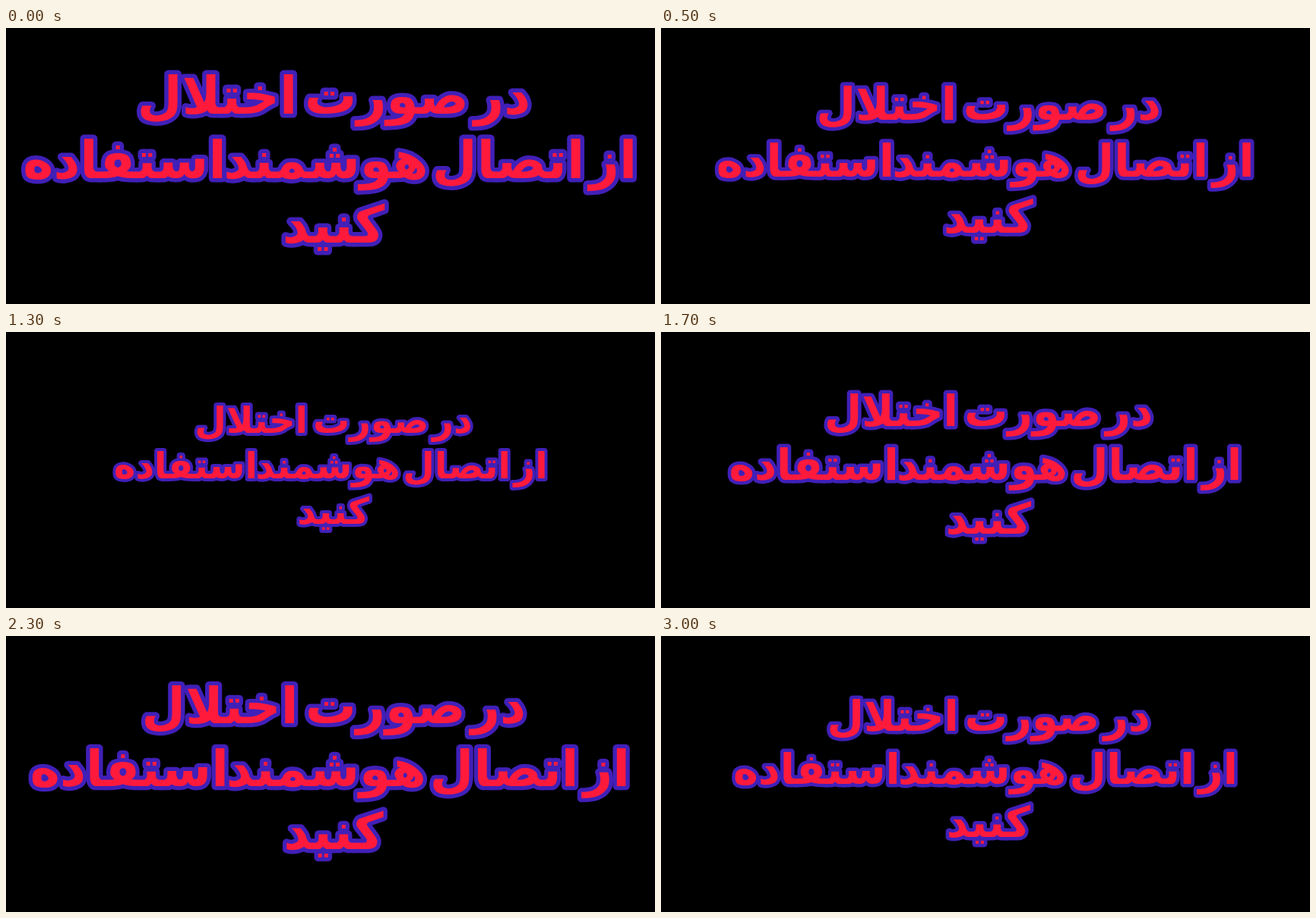
These frames come from a looping animation (854 px wide and 364 px high, 3100 ms). An HTML page with a canvas:

```html
<!DOCTYPE html>
<html lang="fa">
<head>
<meta charset="utf-8">
<style>
  html, body { margin: 0; width: 100%; height: 100%; overflow: hidden; background: #000; }
  canvas { display: block; }
</style>
</head>
<body>
<canvas id="stage" width="854" height="364"></canvas>
<script>
const ctx = document.getElementById('stage').getContext('2d');
const LOOP = 3100, STEP = 100;
const CENTER = { x: 430, y: 180.5 };
const LINE_HEIGHT = 85, BASELINE = 17.5;
// Words of each line with their middle, relative to the centre
const LINES = [
  [['در', 223], ['صورت', 71], ['اختلال', -152]],
  [['از', 369], ['اتصال', 231], ['هوشمند', -9], ['استفاده', -274]],
  [['کنید', 1]],
];
// [time in ms, scale], linear in between
const PULSE = [[0, 1], [1250, 0.69], [2210, 1], [2600, 0.9], [3100, 0.802]];

function scaleAt(t) {
  const i = PULSE.findIndex(([time]) => time > t);
  const [t0, s0] = PULSE[i - 1], [t1, s1] = PULSE[i];
  return s0 + (s1 - s0) * (t - t0) / (t1 - t0);
}

function eachWord(paint) {
  LINES.forEach((words, i) => {
    const y = BASELINE + (i - 1) * LINE_HEIGHT;
    words.forEach(([word, x]) => paint(word, x, y));
  });
}

function draw(now) {
  const t = Math.floor(now % LOOP / STEP) * STEP;
  const scale = scaleAt(t);
  ctx.setTransform(1, 0, 0, 1, 0, 0);
  ctx.fillStyle = '#000';
  ctx.fillRect(0, 0, 854, 364);
  ctx.setTransform(scale, 0, 0, scale, CENTER.x, CENTER.y);
  ctx.font = 'bold 68px "DejaVu Sans", sans-serif';
  ctx.direction = 'rtl';
  ctx.textAlign = 'center';
  ctx.lineJoin = 'round';
  ctx.lineWidth = 11;
  ctx.strokeStyle = '#4020b8';
  ctx.fillStyle = '#ff1a3c';
  eachWord((...args) => ctx.strokeText(...args));
  eachWord((...args) => ctx.fillText(...args));
  requestAnimationFrame(draw);
}
requestAnimationFrame(draw);
</script>
</body>
</html>
```
